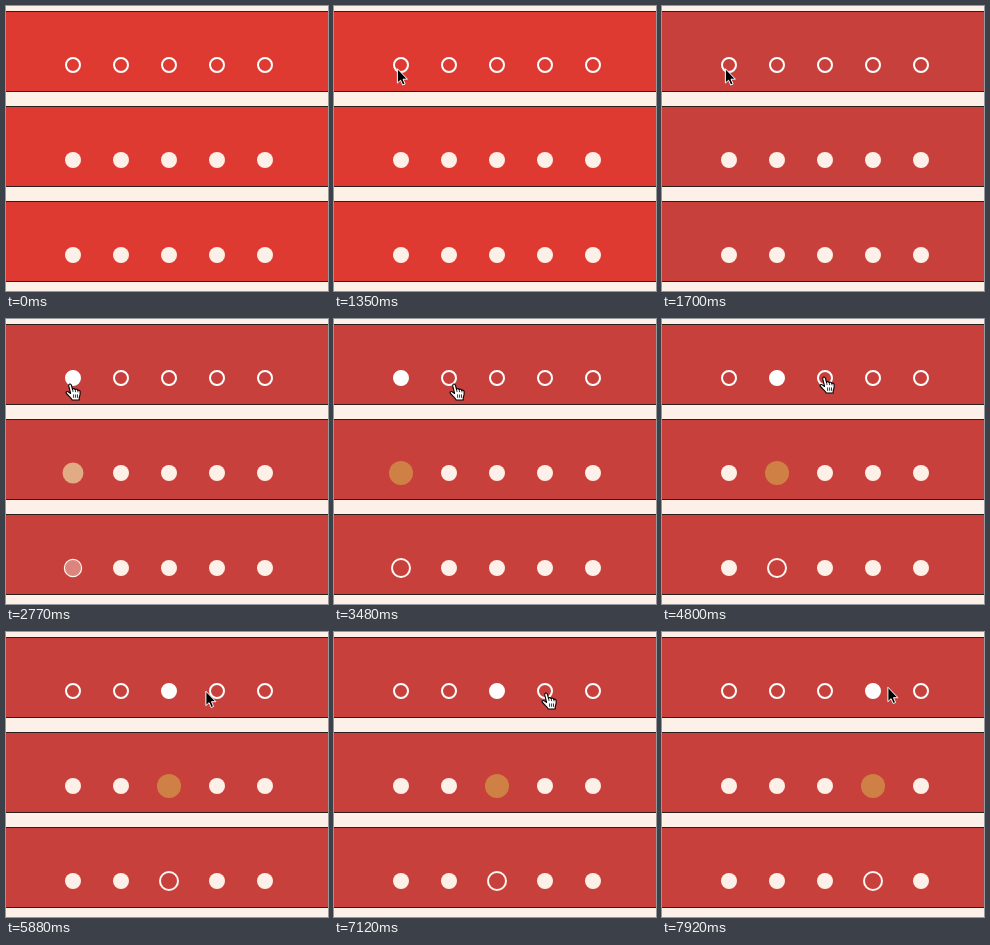
An HTML page for the animation above (8 s loop, 322 by 285 pixels).

```html
<!DOCTYPE html>
<html lang="en">
<head>
<meta charset="utf-8">
<title>Dot navigation</title>
<style>
  html, body { margin: 0; width: 100%; height: 100%; overflow: hidden; }
  svg { display: block; width: 322px; height: 285px; }
</style>
</head>
<body>
<svg id="stage" viewBox="0 0 322 285">
  <rect id="page" width="322" height="285"/>
  <g id="bands"></g>
  <g id="dots"></g>
  <path id="arrow" d="M.9 1.2V15.6L4.1 12.7 6.2 17.5 8.6 16.5 6.5 11.7H10.9Z"
        fill="#000" stroke="#fff" stroke-width="1" stroke-linejoin="round"/>
  <g id="hand" stroke="#000" stroke-width="1.1" stroke-linejoin="round" stroke-linecap="round">
    <path fill="#fff" d="M5.6 10.5 3.8 3.2C3.3 .6 5.8 .1 6.5 2.5L7.5 6.3C8 5.3 9.8 5.3 10.2 6.6 11 5.8 12.6 6.1 12.8 7.4 13.8 6.8 15.2 7.5 15.2 9 15.3 12 14.8 13 14.2 14.5V17H7.2C6.8 15.5 3.5 13 1.2 10.2 .5 8.7 2.5 8 3.6 9Z"/>
    <path fill="none" stroke-width=".8" d="M7.5 6.3 8 8.6M10.2 6.6 10.6 8.8M12.8 7.4 13 9M8.6 11.8V14.4M10.6 11.8V14.4M12.5 11.8V14.4"/>
  </g>
</svg>
<script>
const LOOP = 8000, TICK = LOOP / 90, CLICK_MS = 300, RECOLOR = 1700;
const $ = id => document.getElementById(id);
const WHITE = [255, 255, 255], CREAM = [253, 240, 232], ORANGE = [207, 128, 68];

// Cursor steps: time, shape, left, top
const cursorSteps = [
  [0, null, 0, 0],
  [630, 'arrow', 0, 56], [720, 'arrow', 17, 58], [810, 'arrow', 36, 60],
  [900, 'arrow', 54, 63], [990, 'arrow', 68, 65], [1080, 'arrow', 74, 66],
  [1260, 'arrow', 66, 63], [1350, 'arrow', 62.5, 61.5],
  [2600, 'hand', 59, 64],
  [3300, 'hand', 72, 64], [3390, 'hand', 98, 64], [3480, 'hand', 115, 64],
  [3650, 'hand', 114, 62], [3740, 'hand', 113, 60],
  [4630, 'hand', 122, 60], [4720, 'hand', 144, 58], [4800, 'hand', 157, 57],
  [4980, 'hand', 158, 59], [5070, 'hand', 159, 61],
  [5790, 'hand', 168, 60], [5880, 'arrow', 199, 58], [5970, 'arrow', 212, 59],
  [6060, 'arrow', 217, 59], [6230, 'arrow', 217, 58], [6320, 'arrow', 217, 58.5],
  [7030, 'arrow', 214, 59], [7120, 'hand', 207, 60],
  [7830, 'arrow', 219, 57], [7920, 'arrow', 225, 54]
];

// Per dot: hover start, hover duration, click start
const visits = [[2570, 200, 2630], [3580, 150, 4140], [4930, 200, 5470], [7220, 60, 7420]];

const svg = (name, parent, attrs) => {
  const el = document.createElementNS('http://www.w3.org/2000/svg', name);
  return parent.appendChild(set(el, attrs));
};
function set(el, attrs) {
  for (const key in attrs) el.setAttribute(key, attrs[key]);
  return el;
}
const ease = p => {
  p = Math.min(1, Math.max(0, p));
  return 1 - (1 - p) ** 2 * (1 + p * .6) * (1 - p * .2);
};
const mix = (a, b, p) => `rgb(${a.map((v, i) => Math.round(v + (b[i] - v) * p))})`;

const bands = [5, 100, 195].map(y =>
  svg('rect', $('bands'), { x: -2, y: y + .5, width: 326, height: 80, stroke: '#2b1f1e', 'stroke-width': 1 }));
const rows = [59, 154, 249].map(cy =>
  [67, 115, 163, 211, 259].map(cx => svg('circle', $('dots'), { cx, cy, r: 8 })));

// How far a dot has gone towards its active look
function activity(i, t, start, duration) {
  if (!visits[i]) return 0;
  const next = visits[i + 1];
  const on = ease((t - start) / duration);
  return next ? on * (1 - ease((t - next[2]) / CLICK_MS)) : on;
}

function draw(now) {
  const time = now % LOOP;
  const t = Math.floor(time / TICK) * TICK;
  const late = time >= RECOLOR;

  set($('page'), { fill: late ? '#fdf0e9' : '#fdf1e7' });
  bands.forEach(b => set(b, { fill: late ? '#c8403c' : '#df3a32' }));

  for (let i = 0; i < 5; i++) {
    const [hover, hoverMs, click] = visits[i] || [];
    const filled = activity(i, t, hover, hoverMs);
    const active = activity(i, t, click, CLICK_MS);
    const inset = 2 + 6 * filled;
    set(rows[0][i], { r: 8 - inset / 2, fill: 'none', stroke: mix(WHITE, WHITE, 0), 'stroke-width': inset });
    set(rows[1][i], { r: 8 + 4 * active, fill: mix(CREAM, ORANGE, active) });
    set(rows[2][i], {
      r: 8 + active, fill: mix(CREAM, CREAM, 0), 'fill-opacity': 1 - active,
      stroke: mix(CREAM, WHITE, .3), 'stroke-width': 2 * active
    });
  }

  const [, shape, x, y] = cursorSteps.findLast(step => step[0] <= time);
  for (const id of ['arrow', 'hand'])
    set($(id), { visibility: id === shape ? 'visible' : 'hidden', transform: `translate(${x} ${y})` });
}

const begin = performance.now();
function loop() {
  draw(performance.now() - begin);
  requestAnimationFrame(loop);
}
loop();
</script>
</body>
</html>
```
